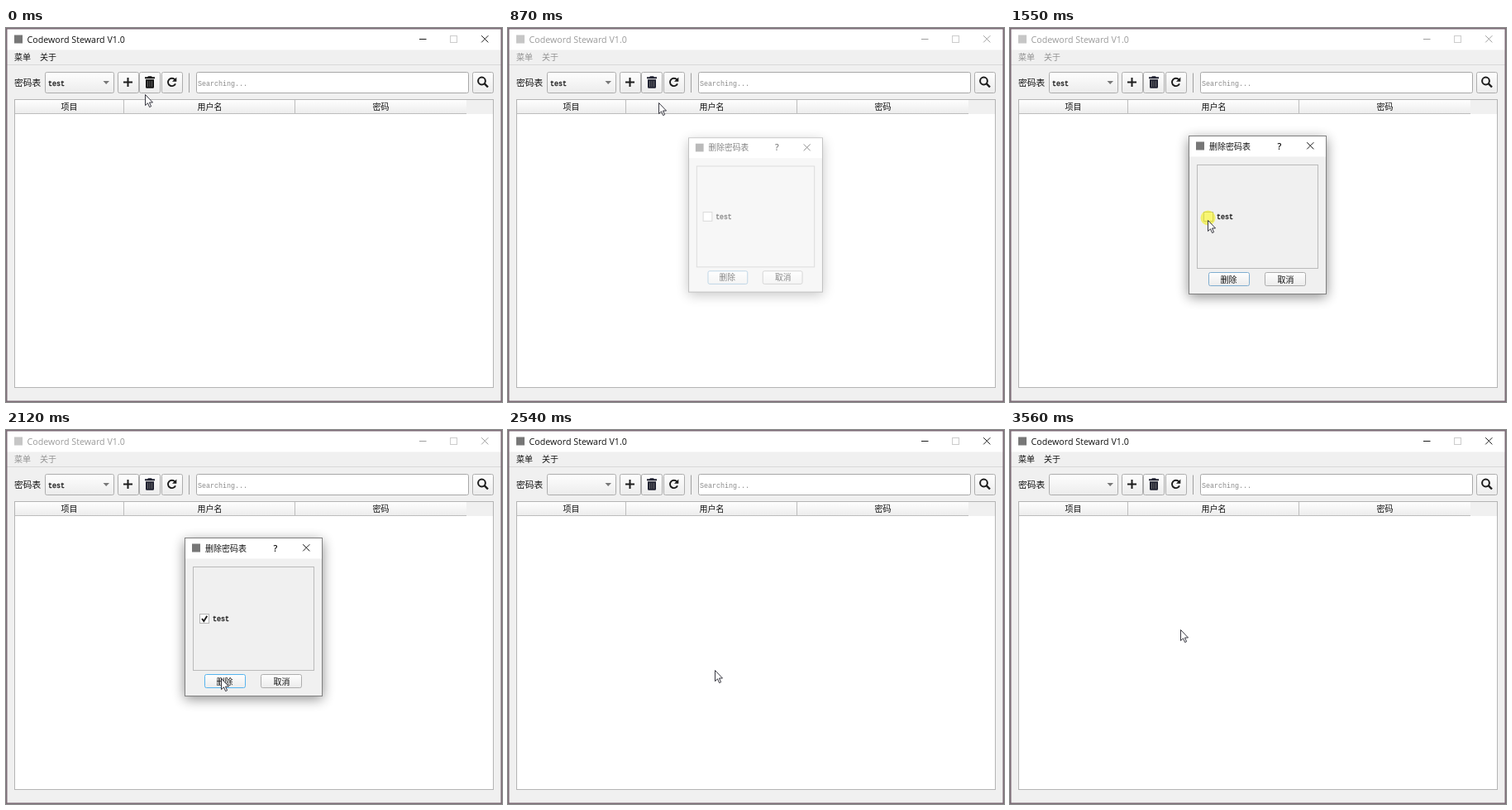
These frames come from a looping animation (600 by 452 pixels, 3760 ms). An HTML page:

```html
<!DOCTYPE html>
<html lang="zh">
<head>
<meta charset="utf-8">
<title>Codeword Steward V1.0</title>
<style>
html, body { margin: 0; width: 100%; height: 100%; overflow: hidden; background: #f0f0f0; }
svg { display: block; width: 100%; height: 100%; }
text { font: 10px "Noto Sans CJK SC", "Noto Sans CJK", sans-serif; fill: #111; }
.title { font: 10.7px "Open Sans", "Noto Sans", sans-serif; }
.mono { font: 8.34px "Liberation Mono", monospace; stroke: #111; stroke-width: .3; }
.hint { fill: #8a8a8a; stroke: none; }
.mid { text-anchor: middle; }
.box { fill: url(#face); stroke: #adadad; }
.line { fill: none; stroke: #1c1c1c; }
.inactive .fade { opacity: .42; }
.pressed { fill: #d9d9d9; }
#remove { stroke: #7fadcf; }
#remove.hover { stroke: #56b4ee; }
#remove.pressed { fill: #dcdcdc; }
</style>
</head>
<body>
<svg viewBox="0 0 600 452" preserveAspectRatio="none">
  <defs>
    <linearGradient id="face" x2="0" y2="1">
      <stop stop-color="#fefefe"/><stop offset="1" stop-color="#ececec"/>
    </linearGradient>
    <filter id="blur" x="-20%" y="-20%" width="140%" height="140%">
      <feGaussianBlur stdDeviation="7.5"/>
    </filter>
    <rect id="tool" class="box" y="53.5" width="25" height="25" rx="2"/>
    <rect id="badge" width="10" height="10" fill="#777"/>
    <path id="cross" class="line" d="M0 0L8.2 8.2M8.2 0L0 8.2"/>
  </defs>

  <g id="main">
    <rect width="600" height="452" fill="#f0f0f0"/>
    <rect width="600" height="26.5" fill="#fff"/>
    <path d="M1 44.5H599" stroke="#d9d9d9"/>
    <g class="fade">
      <use href="#badge" x="10" y="8.5"/>
      <text class="title" x="25.5" y="17.5">Codeword Steward V1.0</text>
      <path class="line" d="M500 13.5H508.5"/>
      <use href="#cross" x="575.2" y="9.2"/>
      <text x="10" y="38.5">菜单</text>
      <text x="41" y="38.5">关于</text>
    </g>
    <rect x="537.5" y="9.5" width="8" height="8" fill="none" stroke="#ccc"/>

    <text x="10" y="70" style="font-size:10.7px">密码表</text>
    <rect class="box" x="47.5" y="53.5" width="83" height="25" rx="2"/>
    <text id="choice" class="mono" x="51" y="69.5">test</text>
    <path d="M117.5 64H125L121.2 68Z" fill="#777"/>

    <use href="#tool" x="135.5"/>
    <rect id="binFace" class="box" x="161.5" y="53.5" width="25" height="25" rx="2"/>
    <use href="#tool" x="188.5"/>
    <use href="#tool" x="564.5"/>
    <path class="line" d="M142 65.5H153M147.5 60V71" stroke-width="2"/>
    <g id="bin">
      <path d="M168 59.3H171.2L172 58.2H176L176.8 59.3H180V61.3H168ZM169 62.3H179V71.5Q179 72.8 177.7 72.8H170.3Q169 72.8 169 71.5Z"/>
      <path d="M171.5 64V71M174 64V71M176.5 64V71" stroke="#777" stroke-width=".8"/>
    </g>
    <path class="line" d="M204.3 62.4A4.7 4.7 0 1 0 205 67.3" stroke-width="1.9"/>
    <path d="M206.3 59.5V64.7H201Z" fill="#1c1c1c"/>
    <path d="M221.5 54.5V78" stroke="#a0a0a0"/>
    <rect x="230.5" y="53.5" width="329" height="25" rx="2" fill="#fff" stroke="#a8a8a8"/>
    <text class="mono hint" x="232" y="69.5">Searching...</text>
    <circle class="line" cx="575.5" cy="64" r="4.4" stroke-width="2"/>
    <path class="line" d="M578.7 67.2L583 71.5" stroke-width="2.4"/>

    <rect x="10.5" y="86.5" width="579" height="348" fill="#fff" stroke="#b4b4b4"/>
    <rect x="557" y="87" width="32" height="17" fill="#f0f0f0"/>
    <rect x="11" y="87" width="546" height="17" fill="url(#face)"/>
    <path d="M11 103.5H557M142.5 87V104M349.5 87V104" stroke="#bdbdbd"/>
    <text class="mid" x="76.5" y="99.3">项目</text>
    <text class="mid" x="246.5" y="99.3">用户名</text>
    <text class="mid" x="453.5" y="99.3">密码</text>
    <rect x=".75" y=".75" width="598.5" height="450.5" fill="none" stroke="#7d6c77" stroke-width="1.5"/>
  </g>

  <g id="dialog">
    <rect x="216" y="134" width="167" height="191" filter="url(#blur)" opacity=".45"/>
    <rect x="216.5" y="130.5" width="166" height="191" fill="#f0f0f0" stroke="#808080"/>
    <rect x="217" y="131" width="165" height="24.5" fill="#fff"/>
    <use href="#badge" x="225" y="137.5"/>
    <text x="241" y="146.5">删除密码表</text>
    <g id="controls">
      <text class="title mid" x="326" y="146.5" style="font-weight:600">?</text>
      <use href="#cross" x="359.2" y="138.2"/>
    </g>
    <rect x="226.5" y="165.5" width="146" height="125" fill="none" stroke="#bababa"/>
    <rect x="234.5" y="222.5" width="11" height="11" fill="#fff" stroke="#b4b4b4"/>
    <path id="tick" class="line" d="M237 228L239.3 231L243.2 224.8" stroke-width="1.9"/>
    <text class="mono" x="250" y="231">test</text>
    <rect id="remove" class="box" x="240.5" y="295.5" width="49" height="16" rx="2"/>
    <rect class="box" x="308.5" y="295.5" width="49" height="16" rx="2"/>
    <text class="mid" x="264.5" y="307.5">删除</text>
    <text class="mid" x="333.5" y="307.5">取消</text>
  </g>

  <circle id="click" r="9" fill="#f2ee00" opacity=".55"/>
  <path id="cursor" d="M.5 .5V13.6L3.5 10.8L5.6 15.6L7.6 14.7L5.5 10H9.5Z" fill="#fff" stroke="#23232d" stroke-width=".9"/>
</svg>
<script>
const LOOP = 3760, STEP = 70;
const PRESS = 730, OPEN = 870, CHECK = 1490, REMOVE = 2250, CLOSE = 2400;

// The screen refreshes every STEP, counted anew from each of these times
const bursts = [0, PRESS, 1280, 1830, CLOSE, 2950, 3560];

// The pointer rests between moves
const home = { x: 168, y: 80 };
const moves = [
  { from: 0, to: 280, x: 173, y: 63 },
  { from: PRESS, to: PRESS, x: 173, y: 69 },
  { from: 800, to: 1350, x: 245, y: 236 },
  { from: 1350, to: CHECK, x: 239, y: 232 },
  { from: 1560, to: 1760, x: 240, y: 237 },
  { from: 1760, to: 2110, x: 260, y: 300 },
  { from: 2330, to: CLOSE, x: 258, y: 302 },
  { from: CLOSE, to: 2950, x: 227, y: 255 },
  { from: 2950, to: 3230, x: 206, y: 243 },
  { from: 3560, to: 3560, x: 206, y: 241 },
];

const $ = id => document.getElementById(id);
const within = (t, a, b) => t >= a && t < b;
const ramp = (t, a, b) => t >= b ? 1 : Math.max(0, (t - a) / (b - a));
const mix = (a, b, p) => a + (b - a) * p;
const show = (id, on) => $(id).setAttribute("visibility", on ? "visible" : "hidden");
const place = (id, value) => $(id).setAttribute("transform", value);

function snap(time) {
  const start = Math.max(...bursts.filter(b => b <= time));
  return start + STEP * Math.floor((time - start) / STEP);
}

function pointer(t) {
  let { x, y } = home;
  for (const m of moves) {
    const p = ramp(t, m.from, m.to);
    x = mix(x, m.x, p);
    y = mix(y, m.y, p);
  }
  return [Math.round(x), Math.round(y)];
}

function draw(time) {
  const t = snap(time);
  const [x, y] = pointer(t);
  const binDown = within(t, PRESS, OPEN);
  const removeDown = within(t, REMOVE, REMOVE + STEP);

  $("main").classList.toggle("inactive", within(t, OPEN, CLOSE));
  show("choice", t < CLOSE);
  $("binFace").classList.toggle("pressed", binDown);
  $("bin").setAttribute("fill", t < OPEN ? "#111" : "#202231");

  const opened = ramp(t, OPEN - STEP, OPEN + STEP);
  const closed = ramp(t, CLOSE - STEP, CLOSE + STEP) ** 2;
  const alpha = opened - closed;
  $("dialog").setAttribute("opacity", alpha);
  place("dialog", `translate(299.5 226) scale(${mix(.95, 1, alpha)}) translate(-299.5 -226)`);
  show("controls", t < CLOSE);
  show("tick", t > CHECK);
  $("remove").classList.toggle("hover", t > 2000);
  $("remove").classList.toggle("pressed", removeDown);

  show("click", binDown || removeDown || within(t, CHECK, CHECK + 2 * STEP));
  place("click", `translate(${x + .5} ${y - 2.5})`);
  place("cursor", `translate(${x} ${y})`);
}

function loop() {
  draw(performance.now() % LOOP);
  requestAnimationFrame(loop);
}
loop();
</script>
</body>
</html>
```
